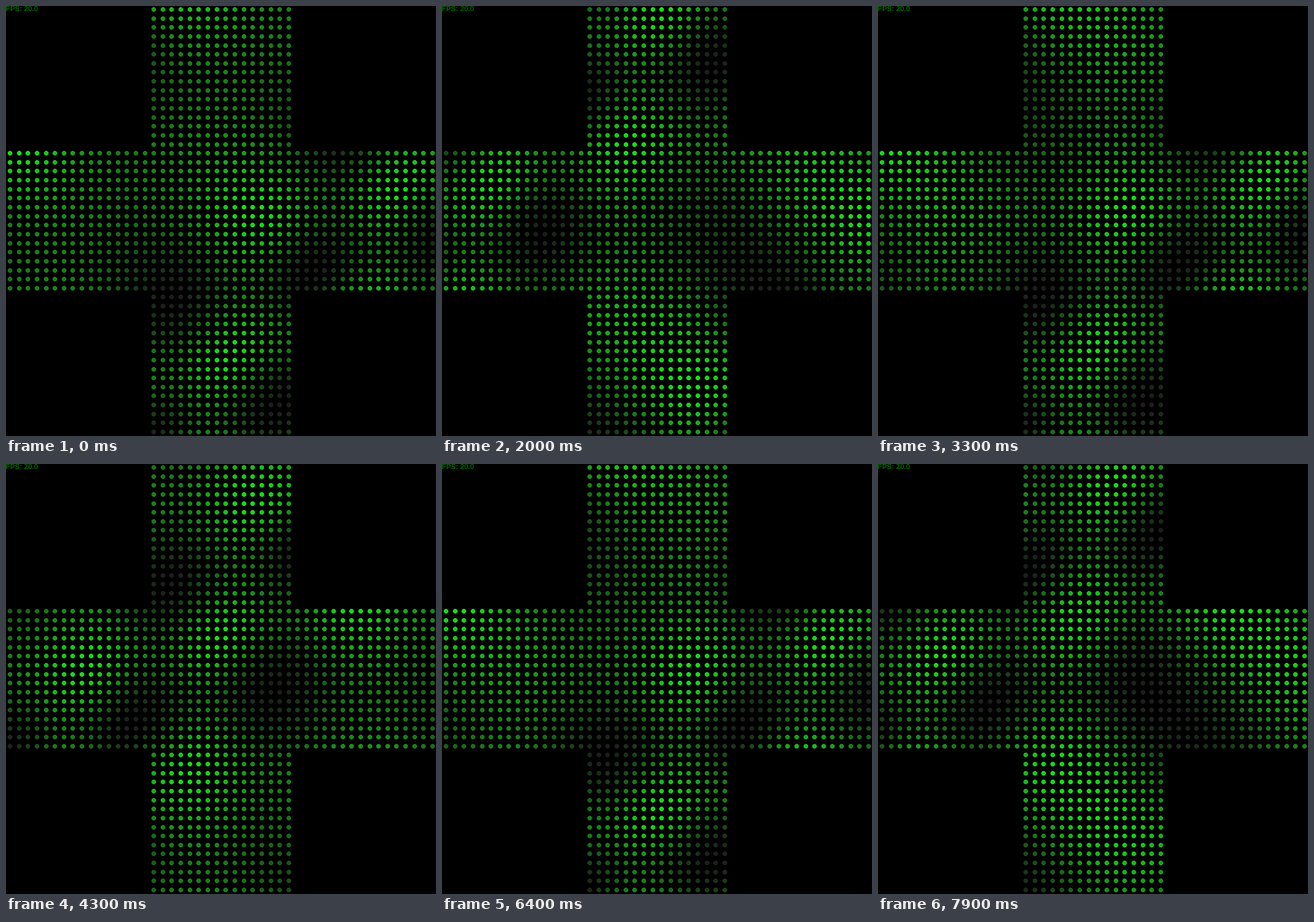
Write an HTML page with a canvas that moves like this. It is 748 px wide and 748 px high and loops after 8 s.

```html
<!DOCTYPE html>
<html lang="en">
<head>
<meta charset="utf-8">
<title>Plasma on five panels</title>
<style>
html, body { margin: 0; width: 100%; height: 100%; overflow: hidden; background: #000; }
canvas { display: block; }
</style>
</head>
<body>
<canvas id="stage" width="748" height="748"></canvas>
<script>
const ctx = document.getElementById("stage").getContext("2d");
const LOOP = 8000, STEP = 100;
const PANEL = 16, GRID = 48, PITCH = 735 / 47;
const SLOW = [[600, 1100], [2200, 2700], [5000, 5500]];

const inMiddle = n => n >= PANEL && n < 2 * PANEL;
const mix = (a, b, v) => Math.round(a + (b - a) * v);

// Two crossed waves whose phase is swayed by a diagonal travelling wave.
function level(x, y, t) {
  const sway = 1.25 * Math.sin((x + y) / 10 + 2 * t - 0.18);
  return 0.5 + 0.25 * (Math.sin(x / 3 + sway) + Math.cos(y / 3 + sway));
}

function dot(x, y, v) {
  const rb = mix(28, 24, v);
  ctx.fillStyle = `rgb(${rb},${mix(28, 222, v)},${rb})`;
  ctx.fillRect(x - 2, y - 4, 4, 8);
  ctx.fillRect(x - 3, y - 3, 6, 6);
  ctx.fillRect(x - 4, y - 2, 8, 4);
}

function draw(ms) {
  ctx.fillStyle = "#000";
  ctx.fillRect(0, 0, 748, 748);
  for (let r = 0; r < GRID; r++) {
    for (let c = 0; c < GRID; c++) {
      if (!inMiddle(r) && !inMiddle(c)) continue;
      dot(Math.round(7 + c * PITCH), Math.round(6 + r * PITCH), level(c, r, ms / 1000));
    }
  }
  const slow = SLOW.some(([from, to]) => ms >= from && ms < to);
  ctx.font = 'bold 12.5px "Liberation Sans", Arial, sans-serif';
  ctx.fillStyle = "rgb(0,100,0)";
  ctx.fillText("FPS: " + (slow ? "19.9" : "20.0"), -0.5, 9);
}

const start = performance.now();
function tick() {
  const ms = (performance.now() - start) % LOOP;
  draw(Math.floor(ms / STEP) * STEP);
  requestAnimationFrame(tick);
}
tick();
</script>
</body>
</html>
```
